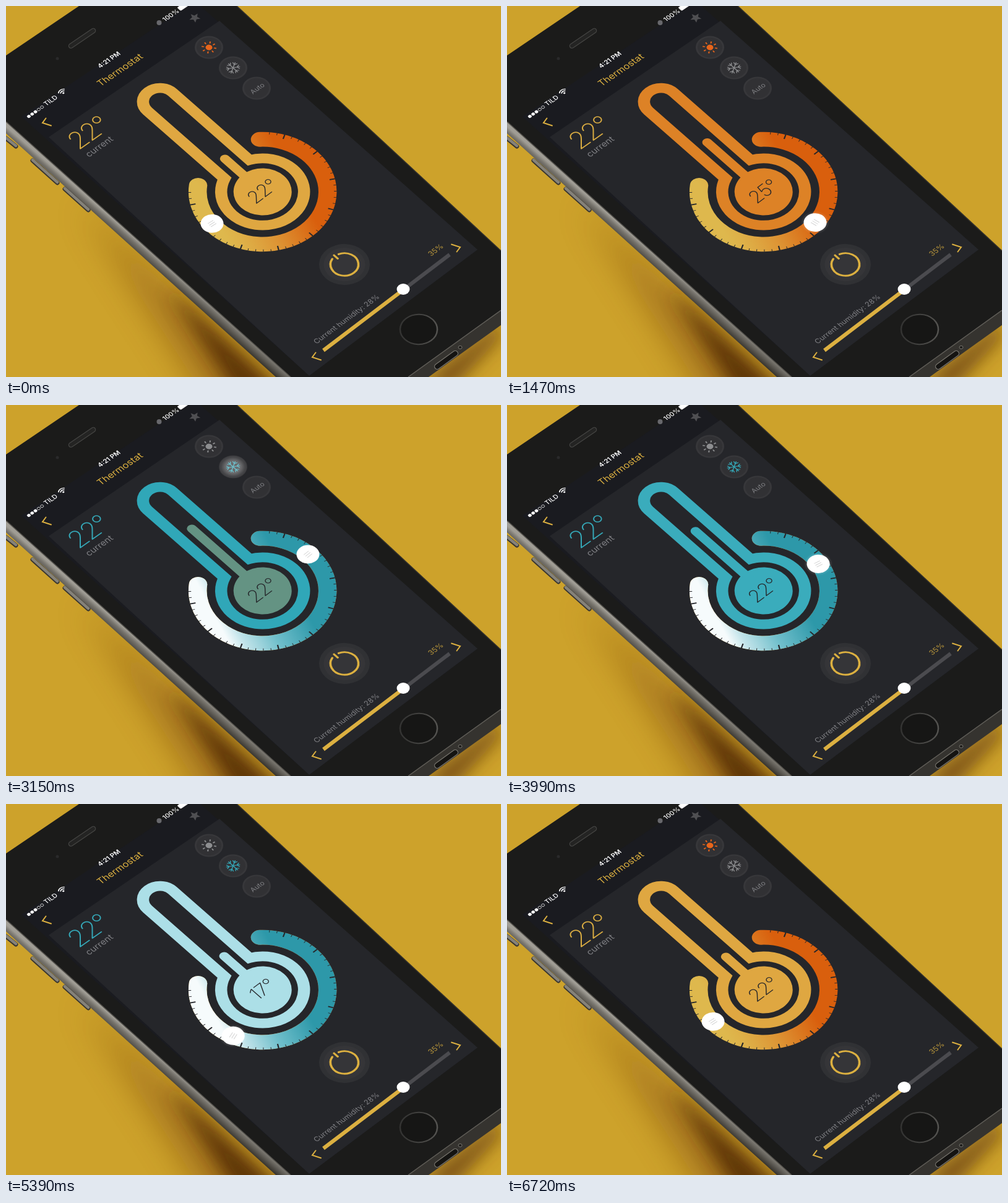
Write an HTML page that moves like this. It is 800x600 px and loops after 7.7 s.

```html
<!DOCTYPE html>
<html lang="en">
<head>
<meta charset="utf-8">
<title>Thermostat</title>
<style>
html, body { margin: 0; width: 100%; height: 100%; overflow: hidden; background: #cda22b; }
svg { display: block; width: 800px; height: 600px; font-family: Inter, Roboto, sans-serif; }
.line { fill: none; stroke-linecap: round; }
.tube { fill: none; stroke: var(--tube); stroke-width: 19.5; }
.core { fill: var(--core); }
.bar { stroke: var(--core); stroke-width: 16; stroke-linecap: round; }
.main { fill: var(--main); }
.sun { fill: var(--sun); stroke: var(--sun); }
.snow { stroke: var(--snow); }
</style>
</head>
<body>
<svg id="stage" viewBox="0 0 800 600"></svg>
<script>
const TILT = 42.6, SQUASH = .808, CENTER = [414.7, 300.5];
const DIAL_START = 229.7, DIAL_RADIUS = 105, KNOB_RADIUS = 103.5, LOOP = 7700, STEP = 70;
const GOLD = '#dcb040', GREY = '#808185';
const SUN_AT = [328, 67], SNOW_AT = [367, 100];

// Puts flat artwork on the tilted screen.
const at = (x, y, tilt = TILT) =>
  `transform="translate(${x} ${y}) scale(1 ${SQUASH}) rotate(${-tilt})"`;
const polar = (r, deg) =>
  [r * Math.cos(deg * Math.PI / 180), r * Math.sin(deg * Math.PI / 180)];
const label = (x, y, size, str, attrs, tilt = TILT) =>
  `<text ${at(x, y, tilt)} font-size="${size}" ${attrs}>${str}</text>`;
const chevron = (x, y, dir) =>
  `<path transform="translate(${x} ${y}) scale(${dir})" class="line" stroke="${GOLD}" stroke-width="2" d="M5.500 -7.500L0 0L14 4.500"/>`;
const button = ([x, y], icon) => `<g ${at(x, y)}>
  <circle r="21.5" fill="#313134" stroke="#37373a" stroke-width="3"/>${icon}</g>`;

function ticks(major) {
  let d = '';
  for (let i = -22; i <= 22; i++) {
    if ((i % 5 === 0) !== major) continue;
    d += `M${polar(120, 90 + 6 * i)}L${polar(major ? 111 : 115.5, 90 + 6 * i)}`;
  }
  return `<path d="${d}" stroke="#26272b" stroke-width="${major ? 2.2 : 1}"/>`;
}

function star(r) {
  const points = [];
  for (let i = 0; i < 10; i++) points.push(polar(i % 2 ? r * .45 : r, i * 36 - 90));
  return `<polygon points="${points.join(' ')}" fill="#4f4f52"/>`;
}

const sunIcon = `<g class="sun"><circle r="5.5" stroke="none"/>
  <circle r="10" fill="none" stroke-width="4" stroke-dasharray="2 5.854"/></g>`;
const snowIcon = [0, 60, 120, 180, 240, 300].map(a =>
  `<path class="line snow" stroke-width="1.4" transform="rotate(${a})" d="M0 0V-11M-3.5 -10L0 -6.5L3.5 -10"/>`).join('');
const dialPath = `M${polar(DIAL_RADIUS, DIAL_START)}A${DIAL_RADIUS} ${DIAL_RADIUS} 0 1 0 ${polar(DIAL_RADIUS, 180 - DIAL_START)}`;
const signal = [0, 1, 2, 3, 4].map(i =>
  `<circle cx="${7 * i}" r="2.6" fill="${i < 3 ? '#fff' : 'none'}" stroke="#fff" stroke-width=".8"/>`).join('');
const dialGradient = (id, stops) =>
  `<linearGradient id="${id}" gradientUnits="userSpaceOnUse" x1="-86" y1="-30" x2="53" y2="19">
    ${stops.map(([offset, color]) => `<stop offset="${offset}" stop-color="${color}"/>`).join('')}</linearGradient>`;

document.getElementById('stage').innerHTML = `
<defs>
  ${dialGradient('warm', [[0, '#deb84d'], [.15, '#deb048'], [.5, '#dd9434'], [1, '#d95f0d']])}
  ${dialGradient('cold', [[0, '#f6fbfc'], [.15, '#c3e4ea'], [.5, '#70bfcb'], [.95, '#2d98a9']])}
  <linearGradient id="metal" gradientUnits="userSpaceOnUse" x1="200" y1="368" x2="187" y2="383">
    <stop stop-color="#a09d95"/><stop offset=".3" stop-color="#77746d"/><stop offset="1" stop-color="#38352f"/>
  </linearGradient>
  <linearGradient id="rim" x2="1" y2="1">
    <stop stop-color="#2c2c2b"/><stop offset="1" stop-color="#5b5a57"/>
  </linearGradient>
  <radialGradient id="glow">
    <stop offset=".55" stop-color="#fff" stop-opacity=".28"/><stop offset="1" stop-color="#fff" stop-opacity="0"/>
  </radialGradient>
  <filter id="wide" x="-50%" y="-50%" width="200%" height="200%"><feGaussianBlur stdDeviation="26"/></filter>
  <filter id="near" x="-50%" y="-50%" width="200%" height="200%"><feGaussianBlur stdDeviation="14"/></filter>
</defs>
<rect width="800" height="600" fill="#cda22b"/>
<polygon points="120,320 480,660 340,660" fill="#7a4408" opacity=".5" filter="url(#wide)"/>
<polygon points="260,455 500,670 400,670" fill="#4a2406" opacity=".8" filter="url(#near)"/>
<polygon points="670,610 800,510 800,535 720,620" fill="#5a3008" opacity=".7" filter="url(#near)"/>

<polygon points="0,186 460,600 436,600 0,206" fill="url(#metal)"/>
<g class="line" stroke-width="7">
  <path stroke="#3a3731" d="M0 214L16 227M43 250L83 286M95 296L133 330"/>
  <path stroke="#85827a" stroke-width="4.5" d="M0 213L16 226M43 249L83 285M95 295L133 329"/>
</g>
<polygon points="650,600 800,492 800,516 683,600" fill="#35332f"/>
<polygon points="0,80 118,0 373,0 800,396 800,492 650,600 460,600 0,187" fill="#1b1b1a"/>
<path d="M0 187L460 600" stroke="#54524d" stroke-width="1.5"/>
<path d="M650 600L800 492" stroke="#5f5d58" stroke-width="1.5"/>
<path d="M373 0L800 396" stroke="#34322c" stroke-width="1.5"/>
<path class="line" d="M697 583L726 562" stroke="#77746d" stroke-width="10"/>
<path class="line" d="M697 583L726 562" stroke="#151412" stroke-width="7.5"/>
<ellipse cx="734" cy="552" rx="3" ry="2.5" fill="#1d1c1a" stroke="#77746d"/>
<path class="line" d="M105 64.500L141 40" stroke="#454543" stroke-width="8.500"/>
<path class="line" d="M105 64.500L141 40" stroke="#242423" stroke-width="6"/>
<circle cx="83" cy="85" r="2.5" fill="#2a2a2b"/>
<g ${at(667, 523)}><circle r="30" fill="#161615" stroke="url(#rim)" stroke-width="2.5"/></g>

<polygon points="25,179 293,0 314,0 762,394 490,598" fill="#1a1b20"/>
<polygon points="69,212 345,24 762,394 490,598" fill="#25262a"/>

<g ${at(37, 178.5, 41)}>${signal}</g>
${label(65, 162, 11.5, 'TILD', 'fill="#fff" font-weight="500"', 40.1)}
<g ${at(92, 140, 40.1)} class="line" stroke="#fff" stroke-width="1.8">
  <path d="M-6 -4A8.5 8.5 0 0 1 6 -4M-3.6 -1.5A5 5 0 0 1 3.6 -1.5"/><circle cy="1.2" r=".8"/></g>
${label(152, 101, 11.5, '4:21 PM', 'fill="#fff" font-weight="600"', 40.1)}
<circle cx="247.500" cy="27" r="4" fill="#68686c"/>
${label(257, 25.5, 11.5, '100%', 'fill="#fff" font-weight="500"', 40.1)}
<g ${at(279, 5, 40.1)}><rect y="-4" width="22" height="9" rx="2" fill="#fff"/></g>
${label(153, 130.5, 16.7, 'Thermostat', `fill="${GOLD}"`, 40.1)}
${chevron(59, 189, 1)}
<g ${at(305, 19)}>${star(9.5)}</g>

${button(SUN_AT, sunIcon)}
${button(SNOW_AT, snowIcon)}
${button([405, 133], '')}
${label(399, 143, 12, 'Auto', `fill="${GREY}"`, 41)}

${label(117, 234, 47, '22°', 'class="main" font-weight="200" letter-spacing="-3"', 41)}
${label(134, 245, 15.7, 'current', `fill="${GREY}"`, 41)}

<g ${at(...CENTER)}>
  <path class="line" d="${dialPath}" stroke="url(#warm)" stroke-width="29.5"/>
  <path class="line" id="coldDial" d="${dialPath}" stroke="url(#cold)" stroke-width="29.5"/>
  ${ticks(false)}${ticks(true)}
  <path class="tube" d="M-27.500 -61.100V-245A27.500 27.500 0 0 1 27.500 -245V-61.100A67 67 0 1 1 -27.500 -61.100Z"/>
  <circle class="core" r="47"/>
  <line class="bar" id="bar"/>
  <text id="degrees" y="11" font-size="34" font-weight="200" letter-spacing="-1.5" fill="#25262a" text-anchor="middle"></text>
</g>

<g ${at(547, 418)}>
  <circle r="41" fill="#303134"/><circle r="33.500" fill="#353538"/>
  <path class="line" stroke="${GOLD}" stroke-width="3.6" d="M-7 -21.500A22.600 22.600 0 1 0 7 -21.500M0 -25V-16"/>
</g>

${label(502, 547, 13, 'Current humidity: 28%', `fill="${GREY}"`, 42.4)}
${label(687, 405, 13, '35%', 'fill="#b8953b"', 42.4)}
<path d="M513 557L717 402" stroke="#4b4b4f" stroke-width="6"/>
<path d="M513 557L642 459" stroke="${GOLD}" stroke-width="6"/>
<ellipse cx="642" cy="458" rx="10.5" ry="9" fill="#fff"/>
${chevron(495, 568, 1)}${chevron(734, 390, -1)}

<ellipse id="touch" rx="23" ry="18.600" fill="url(#glow)"/>
<g ${at(...CENTER)}>
  <g id="knob"><circle r="18.500" fill="#fff"/>
    <path d="M-5.500 -4H5.500M-5.500 0H5.500M-5.500 4H5.500" stroke="#cfcfcf"/></g>
</g>`;

const [stage, coldDial, bar, degrees, touch, knob] =
  ['stage', 'coldDial', 'bar', 'degrees', 'touch', 'knob'].map(id => document.getElementById(id));

const HEAT = { from: 45, to: 232, colors: [[223, 167, 65], [222, 134, 41], [212, 103, 18]] };
const COOL = { from: 66, to: 232, colors: [[175, 224, 232], [110, 196, 209], [48, 167, 184]] };
const DIM = [141, 142, 144], ORANGE = [232, 101, 26], CYAN = [53, 169, 185], YELLOW = [220, 174, 66];

const clamp = p => Math.min(1, Math.max(0, p));
const lerp = (a, b, p) => a + (b - a) * p;
const mix = (a, b, p) => a.map((v, i) => lerp(v, b[i], p));
const sine = p => .5 - .5 * Math.cos(Math.PI * p);
const level = (mode, angle) => clamp((angle - mode.from) / (mode.to - mode.from));

function tint({ colors: [low, mid, high] }, p) {
  return p < .5 ? mix(low, mid, p * 2) : mix(mid, high, p * 2 - 1);
}

function draw(t) {
  const ramp = (a, b) => clamp((t - a) / (b - a));
  const ease = (a, b) => sine(ramp(a, b));
  const setColor = (name, rgb) => stage.style.setProperty(name, `rgb(${rgb.map(Math.round)})`);

  const back = ramp(6300, 6580);
  const cool = ramp(2800, 3150) - back;
  const coreCool = ramp(2850, 3290) - back;
  const drag = ramp(3780, 5460);

  const heatAngle = lerp(HEAT.from, HEAT.to, t < 4000 ? ease(560, 2240) : 0);
  const coolAngle = lerp(COOL.to, COOL.from, (drag + sine(drag)) / 2);
  const angle = lerp(heatAngle, coolAngle, t < 3780 ? 0 : cool);
  const heatLevel = level(HEAT, heatAngle), coolLevel = level(COOL, coolAngle);
  const warm = tint(HEAT, heatLevel), cold = tint(COOL, coolLevel);

  setColor('--tube', mix(warm, cold, cool));
  setColor('--core', mix(warm, cold, coreCool));
  setColor('--main', mix(YELLOW, CYAN, cool));
  setColor('--sun', mix(ORANGE, DIM, cool));
  setColor('--snow', mix(DIM, CYAN, cool));
  coldDial.style.opacity = cool;

  const shown = lerp(heatLevel, coolLevel, t < 3780 ? 0 : cool);
  bar.setAttribute('y2', -lerp(90, 169, shown));
  const value = cool > .5 ? 14.6 + coolAngle / 31 : 20.5 + heatAngle / 32;
  degrees.textContent = Math.round(value) + '°';

  const dialAngle = DIAL_START - angle;
  knob.setAttribute('transform', `rotate(${dialAngle}) translate(${KNOB_RADIUS})`);

  const [dx, dy] = polar(KNOB_RADIUS, dialAngle - TILT);
  const knobAt = [CENTER[0] + dx, CENTER[1] + dy * SQUASH];
  let finger = mix([380, 445], knobAt, ease(210, 560));
  finger = mix(finger, SNOW_AT, ease(2310, 2810) - ease(3150, 3640));
  finger = mix(finger, SUN_AT, ease(5460, 6160));
  touch.setAttribute('transform', `translate(${finger})`);
  touch.style.opacity = t < 6720 ? ramp(210, 350) : 0;
}

function tick(now) {
  draw(Math.floor((now % LOOP) / STEP) * STEP);
  requestAnimationFrame(tick);
}
draw(0);
requestAnimationFrame(tick);
</script>
</body>
</html>
```
